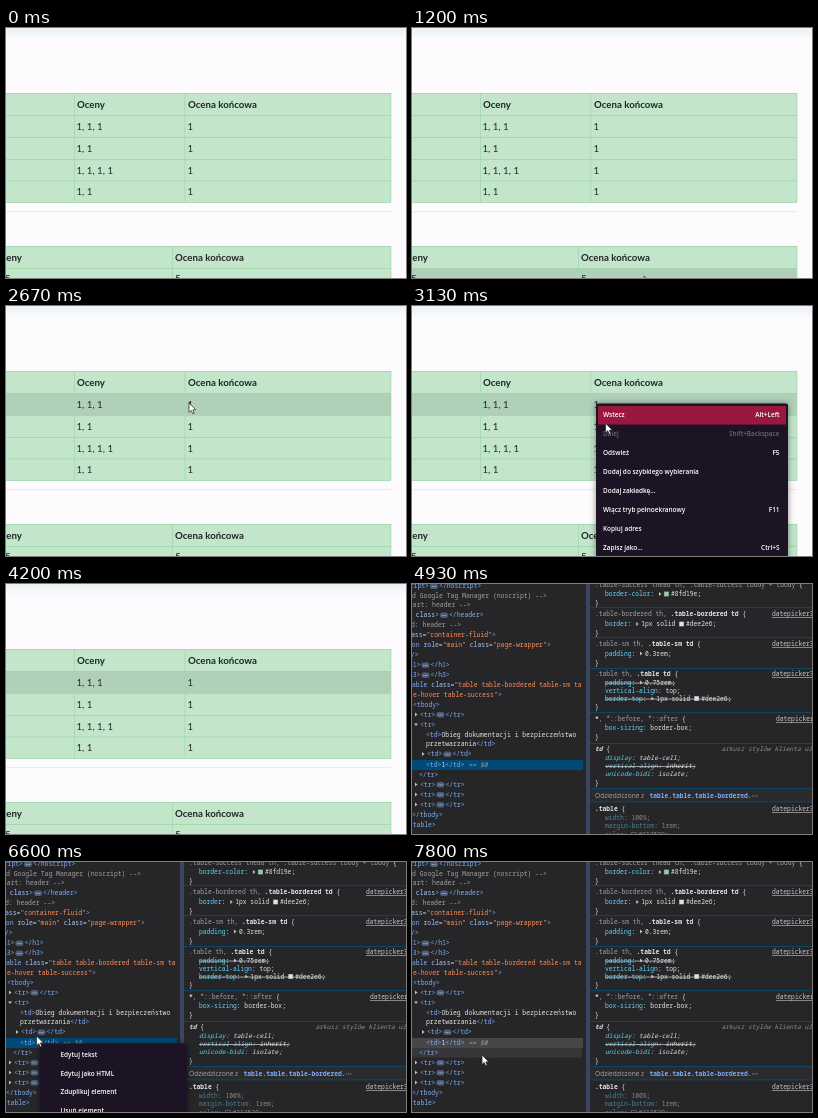
These frames come from a looping animation (400 by 250 pixels, 8000 ms). An HTML page with a canvas:

```html
<!DOCTYPE html>
<html lang="pl">
<head>
<meta charset="utf-8">
<style>
html, body { margin: 0; height: 100%; overflow: hidden; background: #fdfbfe; }
canvas { display: block; }
</style>
</head>
<body>
<canvas id="stage" width="400" height="250"></canvas>
<script>
const ctx = document.getElementById('stage').getContext('2d');
const LOOP = 8000;
const PAGE = '"Lato", sans-serif', UI = '"Open Sans", sans-serif', MONO = '"Noto Sans Mono", monospace';
// t: tag, a: attribute, v: value, w: text, g: comment, p: pill, s: property, d/b: dimmed text/property
const colors = {
  t: '#7cacf8', a: '#a8c7fa', v: '#fe8d59', w: '#e3e3e3', g: '#a0a0a2', p: '#7cacf8',
  s: '#5cd5fb', d: '#8a8a8c', b: '#478094'
};
const PANEL = '#262628', DIVIDER = '#0c4a70';

function rect(x, y, w, h, color) {
  ctx.fillStyle = color;
  ctx.fillRect(x, y, w, h);
}

function text(str, x, y, font, color, align = 'left') {
  ctx.font = font;
  ctx.fillStyle = color;
  ctx.textAlign = align;
  ctx.fillText(str, x, y);
}

function polygon(points, color) {
  ctx.beginPath();
  points.forEach(([x, y]) => ctx.lineTo(x, y));
  ctx.closePath();
  ctx.fillStyle = color;
  ctx.fill();
}

// Position along [time, x, y] keys, or null outside them.
function follow(keys, t) {
  if (t < keys[0][0] || t > keys[keys.length - 1][0]) return null;
  const i = Math.max(1, keys.findIndex(k => k[0] >= t));
  const [t0, x0, y0] = keys[i - 1], [t1, x1, y1] = keys[i];
  const p = (t - t0) / (t1 - t0);
  return { x: x0 + (x1 - x0) * p, y: y0 + (y1 - y0) * p };
}

function drawCursor(pos) {
  if (!pos) return;
  ctx.save();
  ctx.translate(pos.x, pos.y);
  polygon([[0, 0], [0, 9.4], [2.2, 7.4], [3.7, 10.8], [5.2, 10.1], [3.8, 6.9], [6.7, 6.7]], '#fff');
  ctx.strokeStyle = '#222';
  ctx.lineWidth = 0.7;
  ctx.stroke();
  ctx.restore();
}

function drawMenu(x, y, w, pitch, textX, items, hover) {
  ctx.save();
  ctx.shadowColor = 'rgba(0,0,0,.45)';
  ctx.shadowBlur = 6;
  ctx.fillStyle = '#1c1424';
  ctx.beginPath();
  ctx.roundRect(x, y, w, 300, 2);
  ctx.fill();
  ctx.restore();
  const font = `600 6.45px ${UI}`;
  items.forEach(([label, key = '', disabled], i) => {
    const mid = y + 11.5 + i * pitch;
    if (i === hover && !disabled) rect(x + 2, mid - 9, w - 4, 18.5, '#9a1840');
    const color = disabled ? '#6b6572' : '#fff';
    text(label, textX, mid + 2.3, font, color);
    text(key, x + w - 8.5, mid + 2.3, font, color, 'right');
  });
}

/* ---- Grades page ---- */

const pageMenu = [
  ['Wstecz', 'Alt+Left'], ['Dalej', 'Shift+Backspace', true], ['Odśwież', 'F5'],
  ['Dodaj do szybkiego wybierania'], ['Dodaj zakładkę...'],
  ['Włącz tryb pełnoekranowy', 'F11'], ['Kopiuj adres'], ['Zapisz jako...', 'Ctrl+S']
];
const pagePath = [
  [1200, 232, 248], [1400, 226, 215], [1730, 210, 153], [2000, 196, 82], [2200, 187, 77],
  [2600, 183, 97], [2900, 183, 97], [3000, 175, 102], [3130, 193.5, 117], [3300, 205, 180], [3470, 214, 252]
];
const pageMenuOpen = 2700, pageMenuClose = 4200;

function drawTable(top, bottom, lines, columns, hoverY) {
  rect(0, top, 385, bottom - top, '#c3e6cb');
  lines.forEach((y, i) => {
    const next = lines[i + 1] ?? bottom;
    if (hoverY >= y && hoverY < next) rect(0, y, 385, next - y, '#b1d0b8');
  });
  [...lines, bottom].forEach(y => rect(0, y, 385, 0.8, '#9fd5ac'));
  [...columns, 384.5].forEach(x => rect(x, top, 0.8, bottom - top, '#a3d8b0'));
}

function drawPage(t) {
  rect(0, 0, 400, 250, '#fdfbfe');
  const shade = ctx.createLinearGradient(0, 0, 0, 12);
  shade.addColorStop(0, '#eaf2f4');
  shade.addColorStop(1, '#fdfbfe');
  rect(0, 0, 400, 12, shade);

  const cursor = follow(pagePath, t);
  let hoverY = -1;
  if (t >= pageMenuOpen && t < 4270) hoverY = 98;
  else if (cursor) hoverY = cursor.y;

  drawTable(65, 174, [65, 87, 109, 131, 152.5], [68, 178.5], hoverY);
  rect(0, 183.3, 385, 0.8, '#e4e3e8');
  drawTable(218, 262, [218, 240], [166], hoverY);

  const bold = `bold 9.7px ${PAGE}`, plain = `9.7px ${PAGE}`, ink = '#212529';
  text('Oceny', 71, 80, bold, ink);
  text('Ocena końcowa', 182, 80, bold, ink);
  ['1, 1, 1', '1, 1', '1, 1, 1, 1', '1, 1'].forEach((grades, i) => {
    const y = 102 + i * 21.8;
    text(grades, 70.5, y, plain, ink);
    text('1', 181.5, y, plain, ink);
  });
  text('Oceny', -12, 233, bold, ink);
  text('Ocena końcowa', 169, 233, bold, ink);
  text('5', -1, 254, plain, ink);
  text('5', 169, 254, plain, ink);

  if (t >= pageMenuOpen && t < pageMenuClose) {
    const inside = cursor && cursor.x > 184 && cursor.y > 99;
    drawMenu(184, 97.5, 192, 18.9, 191, pageMenu, inside ? Math.floor((cursor.y - 99.5) / 18.9) : -1);
  }
  drawCursor(cursor);
}

/* ---- Inspector ---- */

// Each line is [x, y, source, arrow]; {key} switches colour, {p} also inserts a collapsed-content pill.
const markup = [
  [-17.7, 2, '{t}noscript>{p}</noscript>'],
  [0, 11.5, '{g}d Google Tag Manager (noscript) -->'],
  [-3, 21, '{g}tart: header -->'],
  [0, 31, '{a} class{t}>{p}</header>'],
  [-1, 41, '{g}d: header -->'],
  [-1, 51, '{a}ass={v}"container-fluid"{t}>'],
  [-4, 61, '{t}ion {a}role={v}"main" {a}class={v}"page-wrapper"{t}>'],
  [-1, 71, '{t}/>'],
  [-7, 81, '{t}<h1>{p}</h1>'],
  [-7, 91, '{t}<h3>{p}</h3>'],
  [0, 101, '{t}able {a}class={v}"table table-bordered table-sm ta'],
  [1, 110.5, '{v}e-hover table-success"{t}>'],
  [1, 120.5, '{t}<tbody>'],
  [8, 130.5, '{t}<tr>{p}</tr>', 'shut'],
  [8, 140.5, '{t}<tr>', 'open'],
  [14, 150.5, '{t}<td>{w}Obieg dokumentacji i bezpieczeństwo'],
  [14, 160, '{w}przetwarzania{t}</td>'],
  [15, 170, '{t}<td>{p}</td>', 'shut'],
  [14, 181, '{t}<td>{w}1{t}</td>{g} == $0'],
  [7, 190.5, '{t}</tr>'],
  [8, 200.5, '{t}<tr>{p}</tr>', 'shut'],
  [8, 210.5, '{t}<tr>{p}</tr>', 'shut'],
  [8, 220.5, '{t}<tr>{p}</tr>', 'shut'],
  [0, 230.5, '{t}</tbody>'],
  [-7, 240.5, '{t}</table>']
];

// Properties are [y, name, value, swatch, struck]; a leading ">" in the value is an expand arrow.
const link = 'datepicker3.css';
const rules = [
  { y: 1, pre: '.table-success thead th, .table-success tbody + tbody', end: 18.5,
    props: [[10, 'border-color', '>', '#8fd19e']] },
  { y: 30, pre: '.table-bordered th, ', sel: '.table-bordered td', link: 360, end: 49,
    props: [[40, 'border', '>1px solid ', '#dee2e6']] },
  { y: 60, pre: '.table-sm th, ', sel: '.table-sm td', link: 360, end: 79,
    props: [[69.5, 'padding', '>0.3rem']] },
  { y: 90, pre: '.table th, ', sel: '.table td', link: 360, end: 123,
    props: [[98.5, 'padding', '>0.75rem', '', true], [106.5, 'vertical-align', 'top'],
            [114.5, 'border-top', '>1px solid ', '#dee2e6', true]] },
  { y: 135, sel: '*', post: ', *::before, *::after', link: 364, end: 153,
    props: [[144, 'box-sizing', 'border-box']] },
  { y: 165, sel: 'td', italic: true, end: 198.5,
    props: [[174, 'display', 'table-cell'], [182, 'vertical-align', 'inherit', '', true],
            [190, 'unicode-bidi', 'isolate']] },
  { y: 225, sel: '.table', link: 360, dim: true,
    props: [[234, 'width', '100%'], [242, 'margin-bottom', '1rem'], [250.5, 'color', '', '#212529']] }
];

const nodeMenu = [['Edytuj tekst'], ['Edytuj jako HTML'], ['Zduplikuj element'], ['Usuń element']];
const nodePath = [
  [5270, 100, 248], [5600, 72, 220], [5900, 42, 188], [6070, 34, 182], [6200, 30, 180], [6400, 21, 175],
  [6600, 30.5, 174], [6800, 46, 181], [6930, 54, 188], [7030, 84, 198], [7130, 70, 193], [7400, 70, 193]
];
const nodeMenuOpen = 6130, editStart = 7400;

// Draws monospaced text and returns the x where it ends.
function mono(str, x, y, color, style = '500', size = 6.3) {
  text(str, x, y + 2.2, `${style} ${size}px ${MONO}`, color);
  return x + str.length * size * 0.6;
}

function arrow(x, y, open) {
  polygon(open ? [[x - 2, y - 1], [x + 2, y - 1], [x, y + 1.5]]
               : [[x - 1, y - 2], [x + 1.5, y], [x - 1, y + 2]], '#c0c0c4');
}

function pill(x, y) {
  ctx.fillStyle = '#4b5f7c';
  ctx.beginPath();
  ctx.roundRect(x + 1, y - 2.5, 8, 5.5, 2.5);
  ctx.fill();
  for (let i = 0; i < 3; i++) rect(x + 3 + i * 1.6, y, 0.8, 0.8, '#d7d7db');
}

function drawMarkup() {
  for (const [x0, y, source, state] of markup) {
    let x = x0;
    const parts = source.split(/\{(\w)\}/);
    for (let i = 1; i < parts.length; i += 2) {
      const [key, str] = [parts[i], parts[i + 1]];
      if (key === 'p') {
        pill(x, y);
        x += 10;
      }
      x = mono(str, x, y, colors[key], str.includes('$0') ? 'italic 500' : '500', 6.43);
    }
    if (state) arrow(x0 - 4, y, state === 'open');
  }
}

function drawProperty([y, name, value, swatch, struck], rule) {
  const style = rule.italic ? 'italic 500' : '500';
  const ink = rule.dim ? colors.d : colors.w;
  let x = mono(name, 193, y, rule.dim ? colors.b : colors.s, style);
  x = mono(': ', x, y, ink, style);
  if (value[0] === '>') {
    arrow(x + 2, y);
    x += 6;
    value = value.slice(1);
  }
  x = mono(value, x, y, ink, style);
  if (swatch) {
    rect(x, y - 2.5, 5, 5, '#8a8a8e');
    rect(x + 0.5, y - 2, 4, 4, swatch);
    x = mono(swatch, x + 7, y, ink);
  }
  x = mono(';', x, y, ink, style);
  if (struck) rect(193, y + 0.2, x - 193, 0.7, '#d4d4d8');
}

function drawRules() {
  rect(178, 0, 222, 250, PANEL);
  rect(178, 204.5, 222, 13, '#2b2b2e');
  [23.2, 53.2, 84, 128.2, 159, 204, 217.4].forEach(y => rect(178, y, 222, 0.9, DIVIDER));
  text('Odziedziczone z', 183, 213.5, `6.6px ${UI}`, '#a8a8ac');
  mono('table.table.table-bordered.⋯', 237.5, 211.5, colors.t, '600');

  for (const rule of rules) {
    const style = rule.italic ? 'italic 700' : '700';
    let x = mono(rule.pre || '', 183, rule.y, colors.g);
    x = mono(rule.sel || '', x, rule.y, colors.w, style);
    x = mono(rule.post || '', x, rule.y, colors.g);
    mono(' {', x, rule.y, colors.w);
    if (rule.link) {
      mono(link, rule.link, rule.y, '#c7c7c7');
      rect(rule.link, rule.y + 3.2, 40, 0.6, '#c7c7c7');
    }
    rule.props.forEach(prop => drawProperty(prop, rule));
    if (rule.end) mono('}', 183, rule.end, colors.w);
  }
  mono('arkusz stylów klienta użytkownika', 309.5, 165, '#8f8f92', 'italic');
}

function drawInspector(t) {
  rect(0, 0, 180, 250, PANEL);
  const cursor = t >= 7800 ? { x: 70, y: 193 } : follow(nodePath, t);
  const editing = t >= editStart;
  const menuOpen = t >= nodeMenuOpen && !editing;

  if (editing) {
    rect(0, 186, 170, 9.5, '#37373a');
  } else if (cursor && !menuOpen && cursor.y > 186) {
    rect(0, 186 + Math.floor((cursor.y - 186) / 10) * 10, 170, 10, '#37373a');
  }
  rect(0, 176, 171, 10, editing ? '#474749' : '#004a77');
  drawMarkup();
  rect(174, 0, 4, 250, '#3a4560');
  drawRules();

  if (menuOpen) {
    const inside = cursor && cursor.x > 34 && cursor.y > 183;
    drawMenu(34, 181.5, 147, 18.5, 54.5, nodeMenu, inside ? 0 : -1);
  }
  drawCursor(cursor);
}

function frame(now) {
  const t = now % LOOP;
  if (t < 4600) drawPage(t);
  else drawInspector(t);
  requestAnimationFrame(frame);
}
requestAnimationFrame(frame);
</script>
</body>
</html>
```
